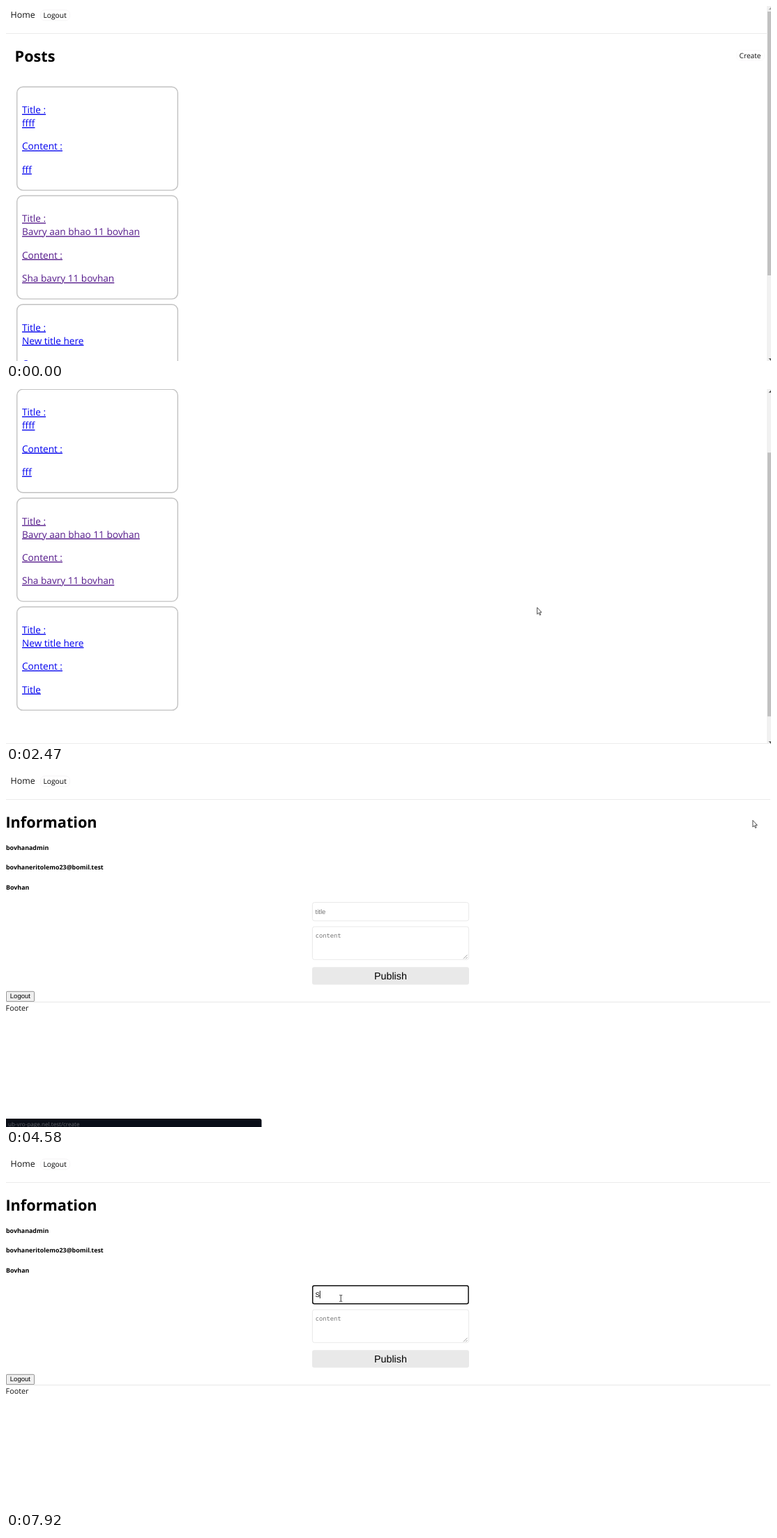
An HTML page for the animation above (8 s loop, 1097x510 px).

```html
<!DOCTYPE html>
<html lang="en">
<head>
<meta charset="utf-8">
<title>Posts</title>
<style>
  html, body { margin: 0; width: 100%; height: 100%; overflow: hidden; background: #fff; }
  svg { display: block; width: 100%; height: 100%; }
  text {
    font-family: "Open Sans", "Noto Sans", sans-serif;
    font-variant-ligatures: none;
    text-rendering: geometricPrecision;
    white-space: pre;
  }
  .bold { font-weight: 700; }
  .arial { font-family: "Liberation Sans", Arial, sans-serif; }
  .mono { font-family: "Noto Sans Mono", "DejaVu Sans Mono", monospace; }
  .link {
    text-decoration: underline;
    text-decoration-thickness: 1px;
    text-underline-offset: 1.5px;
  }
</style>
</head>
<body>
<svg id="stage" viewBox="0 0 1097 510" xmlns="http://www.w3.org/2000/svg"></svg>
<script>
const LOOP = 8000;
const SCROLL_MAX = 155;
const THUMB_RATIO = 0.72;
const stage = document.getElementById('stage');

function add(parent, tag, attrs) {
  const el = document.createElementNS('http://www.w3.org/2000/svg', tag);
  for (const key in attrs) el.setAttribute(key, attrs[key]);
  parent.appendChild(el);
  return el;
}

function label(parent, str, x, y, size, attrs) {
  const el = add(parent, 'text', { x, y, 'font-size': size, fill: '#000', ...attrs });
  el.textContent = str;
  return el;
}

function box(parent, x, y, width, height, attrs) {
  return add(parent, 'rect', { x, y, width, height, fill: 'none', ...attrs });
}

function show(el, on) {
  el.setAttribute('visibility', on ? 'visible' : 'hidden');
}

function header(parent, width) {
  label(parent, 'Home', 6.6, 17, 12.4, { fill: '#111' });
  box(parent, 49.5, 5.8, 42, 15, { rx: 6, stroke: '#f2f0f2', 'stroke-width': 0.7 });
  label(parent, 'Logout', 53.4, 17.2, 10.3);
  box(parent, 0, 39, width, 1, { fill: '#ebebeb' });
}

function footer(parent, y, width) {
  box(parent, 0, y, width, 1, { fill: '#e8e8e8' });
  label(parent, 'Footer', -0.4, y + 13.4, 10.8, { fill: '#111' });
}

// Posts page
const posts = add(stage, 'g', {});
const list = add(posts, 'g', {});
header(list, 1091);
label(list, 'Posts', 12.6, 80, 21.6, { class: 'bold' });
box(list, 1047.5, 63.5, 40, 15, { rx: 6, stroke: '#f8f7f8', 'stroke-width': 0.7 });
label(list, 'Create', 1051.5, 74.8, 10.2, { fill: '#111' });

function card(i, title, content, color) {
  const top = 116.2 + 156.3 * i;
  box(list, 15.7, top, 230.6, 148.4, { rx: 8.5, stroke: '#c2c2c2', 'stroke-width': 1.4 });
  const lines = [['Title :', 37.8], [title, 56.9], ['Content :', 90.2], [content, 123.5]];
  for (const [str, dy] of lines) {
    label(list, str, 23, top + dy, 13.63, { class: 'link', fill: color });
  }
}
card(0, 'ffff', 'fff', '#0000ee');
card(1, 'Bavry aan bhao 11 bovhan', 'Sha bavry 11 bovhan', '#551a8b');
card(2, 'New title here', 'Title', '#0000ee');
footer(list, 625, 1091);

box(posts, 1091, 0, 6, 510, { fill: '#f1f1f1' });
const thumb = box(posts, 1092, 8, 5, 379, {});
const upArrow = add(posts, 'path', { d: 'M1093.5 5.2L1097 1.7V5.2Z' });
const downArrow = add(posts, 'path', { d: 'M1093.5 506.3H1097V509.8Z' });

// Create page
const form = add(stage, 'g', {});
header(form, 1096);
label(form, 'Information', -0.6, 80, 21.7, { class: 'bold' });
['bovhanadmin', 'bovhaneritolemo23@bomil.test', 'Bovhan'].forEach((str, i) =>
  label(form, str, 0, 111.8 + 28.5 * i, 8.9, { class: 'bold' }));

const thin = { rx: 3, stroke: '#e4e4e4', 'stroke-width': 0.8 };
const field = box(form, 439.4, 187.4, 224.2, 26.4, thin);
const focusRing = box(form, 439.7, 187.7, 223.4, 26, { rx: 2.5, stroke: '#101010', 'stroke-width': 1.5 });
const hint = label(form, 'title', 443.6, 204, 9.52, { class: 'arial', fill: '#757575' });
const typed = label(form, 'S', 443.6, 204, 9.52, { class: 'arial' });
const caret = box(form, 444, 195, 0.9, 11, { fill: '#000' });
box(form, 439.4, 222.2, 224.2, 47.4, thin);
label(form, 'content', 443.8, 238.3, 8.73, { class: 'mono', fill: '#757575' });
add(form, 'path', { d: 'M656 268.3L661.6 262.7M659.3 268.3L661.6 266', stroke: '#777', 'stroke-width': 0.7 });
box(form, 439, 280.2, 225, 25.4, { rx: 3, fill: '#e9e9e9' });
label(form, 'Publish', 551.4, 298, 14.3, { class: 'arial', 'text-anchor': 'middle' });
box(form, 0.4, 315.3, 40.2, 14.4, { rx: 1.5, fill: '#efefef', stroke: '#767676', 'stroke-width': 0.8 });
label(form, 'Logout', 5.8, 325.2, 9.52, { class: 'arial' });
footer(form, 330, 1096);

const status = add(form, 'g', {});
add(status, 'path', { d: 'M0 498H363.5Q366.5 498 366.5 501V510H0Z', fill: '#0a0e18' });
label(status, 'ub-vro-page.nel.test/create', 3, 508.6, 8.14, { fill: '#62656c' });

// Pointers
const arrow = add(stage, 'path', {
  d: 'M0.4 0.4V10L2.5 8L4.1 11.4L5.5 10.8L4 7.4H6.8Z',
  fill: '#fff', stroke: '#222', 'stroke-width': 0.8, 'stroke-linejoin': 'round'
});
const beam = add(stage, 'path', {
  d: 'M-2 -4.5H-0.6L0 -4L0.6 -4.5H2M0 -4V4M-2 4.5H-0.6L0 4L0.6 4.5H2',
  fill: 'none', stroke: '#222', 'stroke-width': 0.9
});

// Progress from 0 to 1 in n even jumps, the first at start and the last at end.
function jumps(t, start, end, n) {
  if (t < start) return 0;
  if (t >= end) return 1;
  return (Math.floor((t - start) / (end - start) * (n - 1)) + 1) / n;
}

function along(points, p) {
  const s = p * (points.length - 1);
  const i = Math.min(Math.floor(s), points.length - 2);
  const [a, b] = [points[i], points[i + 1]];
  return [0, 1].map(k => a[k] + (b[k] - a[k]) * (s - i));
}

const moves = [
  { start: 70, end: 220, n: 3, path: [[906, 436], [834, 412]] },
  { start: 450, end: 610, n: 3, path: [[834, 412], [607, 297]] },
  { start: 750, end: 1300, n: 8, path: [[607, 297], [274, 180], [754, 126]] },
  { start: 1450, end: 2160, n: 10, path: [[754, 126], [1024, 57], [761.3, 313.5]] },
  { start: 3330, end: 3330, n: 1, path: [[761.3, 313.5], [1005, 161]] },
  { start: 3710, end: 4490, n: 11, path: [[1102.7, 90.5], [1063, 76], [1070.5, 69]] },
  { start: 4800, end: 5580, n: 11, path: [[1070.5, 69], [480.2, 205.8]] }
];

function pointerAt(t) {
  if (t < 70 || (t >= 3410 && t < 3710)) return null;
  const m = moves.filter(v => t >= v.start).pop();
  return along(m.path, jumps(t, m.start, m.end, m.n));
}

function scrollAt(t) {
  const down = jumps(t, 2310, 2630, 5);
  const up = jumps(t, 2780, 3020, 4);
  const eased = 1 - Math.pow(1 - down, 1.5);
  return SCROLL_MAX * eased * Math.pow(1 - up, 1.157);
}

function draw(t) {
  const onForm = t >= 4580;
  const focused = t >= 5660;
  const hasText = t >= 7920;
  const pos = pointerAt(t);
  const y = scrollAt(t);

  posts.style.display = onForm ? 'none' : '';
  form.style.display = onForm ? '' : 'none';
  list.setAttribute('transform', `translate(0 ${-y})`);
  thumb.setAttribute('y', 8 + y * THUMB_RATIO);
  thumb.setAttribute('fill', pos && pos[0] > 1090 ? '#a8a8a8' : '#c1c1c1');
  upArrow.setAttribute('fill', y > 0 ? '#505050' : '#a3a3a3');
  downArrow.setAttribute('fill', y < SCROLL_MAX ? '#505050' : '#a3a3a3');

  show(status, t < 4800);
  show(field, !focused);
  show(focusRing, focused);
  show(hint, !hasText);
  show(typed, hasText);
  const blinkOff = (t >= 6210 && t < 6740) || (t >= 7290 && t < 7800);
  show(caret, focused && !blinkOff);
  caret.setAttribute('x', hasText ? 449.8 : 444);

  const overField = onForm && pos && pos[0] > 439 && pos[0] < 664 && pos[1] > 187 && pos[1] < 270;
  show(arrow, pos && !overField);
  show(beam, overField);
  if (pos) {
    const place = `translate(${pos[0]} ${pos[1]})`;
    arrow.setAttribute('transform', place);
    beam.setAttribute('transform', place);
  }
}

const begin = performance.now();
function tick() {
  draw((performance.now() - begin) % LOOP);
  requestAnimationFrame(tick);
}
tick();
</script>
</body>
</html>
```
